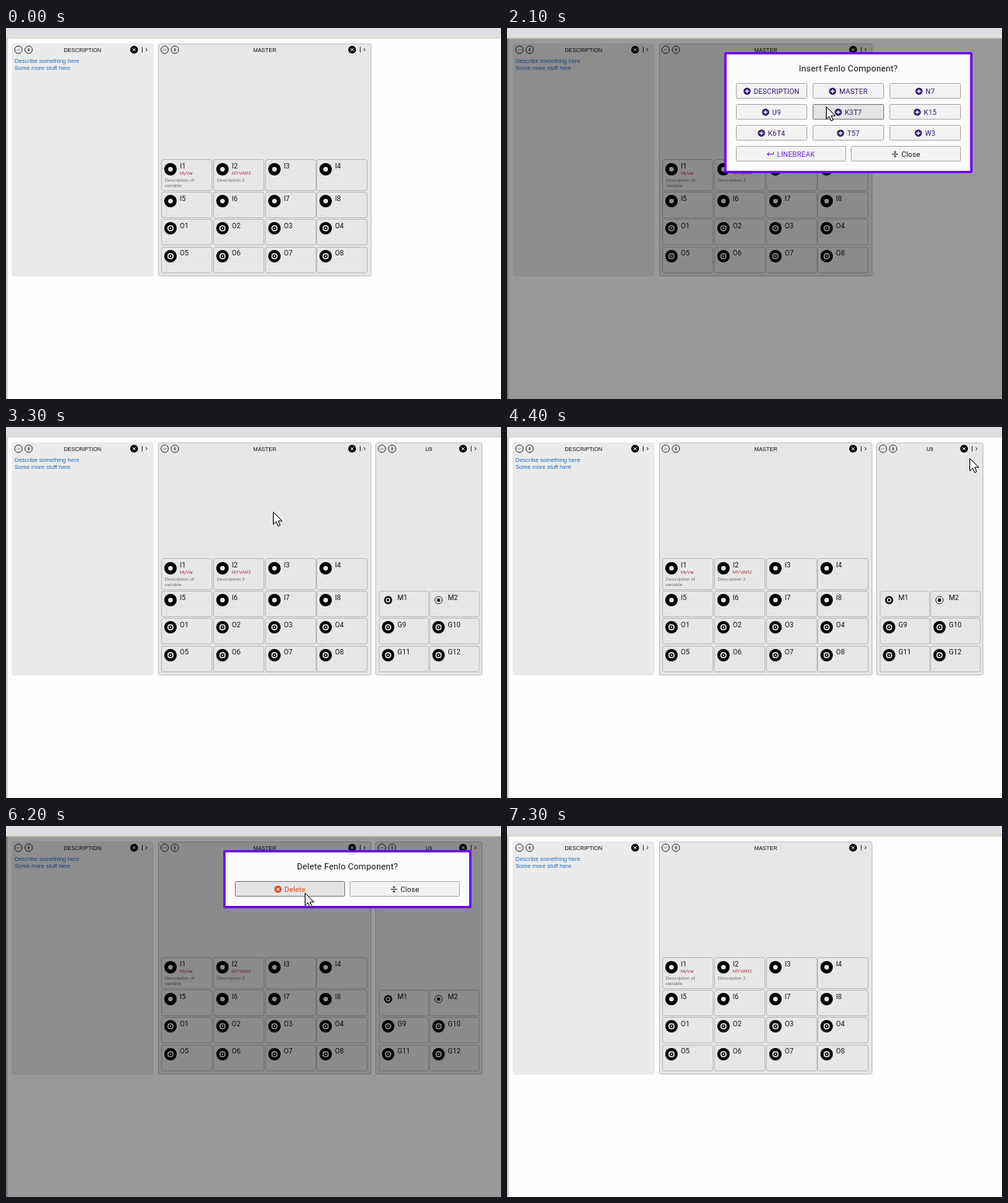
An HTML page that plays this animation: 638x478 px, repeating every 8000 ms.

```html
<!DOCTYPE html>
<html lang="en">
<head>
<meta charset="utf-8">
<title>Module editor</title>
<style>
html, body { margin: 0; width: 100%; height: 100%; overflow: hidden; background: #fff; }
svg { display: block; width: 638px; height: 478px; }
text { font: 7.1px "Liberation Sans", Arial, sans-serif; fill: #111; }
.note { font-size: 7.5px; fill: #2d6cb5; }
.port { font: 9px Roboto, sans-serif; }
.var { font-size: 6.1px; fill: #a8323c; }
.info { font-size: 6.2px; fill: #707070; }
.dots { font-size: 6px; fill: #aaa; }
.line { fill: none; stroke: #222; stroke-width: .9; }
.cell { fill: none; stroke: #bcbcbc; }
.title { font: 11px Roboto, sans-serif; letter-spacing: .2px; text-anchor: middle; }
.button rect { fill: #f3f3f3; stroke: #adadad; }
.button text { font: 9.1px Roboto, sans-serif; letter-spacing: .2px; fill: currentColor; }
.button.hot rect { fill: #e4e4e4; stroke: #808080; }
.button.down rect { fill: #d8d8d8; stroke: #555; }
</style>
</head>
<body>
<svg id="stage" viewBox="0 0 638 478"></svg>
<script>
const LOOP = 8000, STEP = 100;
const stage = document.getElementById('stage');

const rect = (x, y, w, h, attrs) => `<rect x="${x}" y="${y}" width="${w}" height="${h}" ${attrs}/>`;
const disc = (x, y, r, fill = '#000') => `<circle cx="${x}" cy="${y}" r="${r}" fill="${fill}"/>`;
const path = (d, attrs) => `<path d="${d}" ${attrs}/>`;
const text = (x, y, s, cls = '', attrs = '') => `<text x="${x}" y="${y}" class="${cls}" ${attrs}>${s}</text>`;

// Panels
const rows = [[169.5, 40], [211.5, 33], [246.5, 33], [282.5, 33]];

function jack(x, y, kind) {
  if (kind === 'in') return disc(x, y, 8) + disc(x, y, 3, '#e8e8e8');
  if (kind === 'out') return disc(x, y, 8) + disc(x, y, 4, '#eee') + disc(x, y, 2.5) + disc(x, y, 1, '#eee');
  if (kind === 'knob') return disc(x, y, 5.2) + disc(x, y, 3, '#eee') + disc(x, y, 1.7);
  return `<circle cx="${x}" cy="${y}" r="4.8" class="line"/>` + disc(x, y, 2.2);
}

function cell(x, row, w, label, kind, name, info) {
  const [y, h] = rows[row], cy = [182, 223, 258, 294][row], base = [181, 223, 258, 293][row];
  return rect(x, y, w, h, 'rx="2.5" class="cell"') + jack(x + 11.5, cy, kind) +
    text(x + 23.5, base, label, 'port') +
    (name
      ? text(x + 23.5, 189, name, 'var') + info.map((s, i) => text(x + 4, 198 + 7 * i, s, 'info')).join('')
      : text(x + 23.5, base + 9, '..', 'dots') + text(x + 4, y + h - 4 - (row ? 0 : 6), '..', 'dots'));
}

function panel(x, w, title, fill, stroke, body) {
  const right = x + w;
  return rect(x + .5, 20.5, w - 1, 299, `rx="2" fill="${fill}" stroke="${stroke}"`) +
    [8.5, 21.7].map(dx => `<circle cx="${x + dx}" cy="28" r="4.8" class="line"/>`).join('') +
    path(`M${x + 6} 28h5M${x + 19.2} 28h5`, 'class="line" opacity=".45"') +
    path(`M${x + 21.7} 25.5v5`, 'class="line"') +
    text(x + w / 2, 30.5, title, '', 'text-anchor="middle"') +
    disc(right - 24.9, 28, 5) +
    path(`M${right - 26.7} 26.2l3.6 3.6m0-3.6l-3.6 3.6`, 'stroke="#fff"') +
    path(`M${right - 14.5} 24.5v7m4.5-5.5l2 2-2 2`, 'class="line"') + body;
}

const named = { 0: ['MyVar', ['Description of', 'variable']], 1: ['MYVAR2', ['Description 2']] };
const masterCells = Array.from({ length: 16 }, (_, i) =>
  cell(200.5 + Math.round(i % 4 * 66.8), i >> 2, 65, (i < 8 ? 'I' : 'O') + (i % 8 + 1),
    i < 8 ? 'in' : 'out', ...(named[i] || []))).join('');
const extraCells = ['M1', 'M2', 'G9', 'G10', 'G11', 'G12'].map((label, i) =>
  cell(481 + i % 2 * 65, 1 + (i >> 1), 64, label, ['knob', 'ring'][i] || 'out')).join('');

// Dialogs
const round = tilt => disc(0, 0, 4.6, 'currentColor') +
  path('M-2.6 0h5.2M0-2.6v5.2', `stroke="#f3f3f3" stroke-width="1.3" transform="rotate(${tilt})"`);
const icons = {
  plus: round(0),
  cross: round(45),
  enter: path('M4-3V0H-4M-1.5-2.5L-4 0l2.5 2.5', 'fill="none" stroke="currentColor"'),
  fold: path('M-4 0h8M0-4.5v3M0 4.5v-3M-1.5-3L0-1.5 1.5-3M-1.5 3L0 1.5 1.5 3', 'fill="none" stroke="currentColor" stroke-width=".9"')
};
const wide = (side, row, label, icon, color) => ({ x: 295.5 + 148 * side, y: 71.5 + 27 * row, w: 141, label, icon, color });
const modules = ['DESCRIPTION', 'MASTER', 'N7', 'U9', 'K3T7', 'K15', 'K6T4', 'T57', 'W3'].map((label, i) => ({
  x: 295.5 + 99 * (i % 3), y: 71.5 + 27 * Math.floor(i / 3), w: 91, label, icon: 'plus', color: '#32196b'
}));

const dialogs = [
  { title: 'Insert Fenlo Component?', h: 153, open: 1600, close: 3100, lead: 80, press: [2900, 3100],
    buttons: [...modules, wide(0, 3, 'LINEBREAK', 'enter', '#6a1be8'), wide(1, 3, 'Close', 'fold', '#111')] },
  { title: 'Delete Fenlo Component?', h: 72, open: 5300, close: 6700, lead: 110, press: [6400, 6500],
    buttons: [wide(0, 0, 'Delete', 'cross', '#e8400c'), wide(1, 0, 'Close', 'fold', '#111')] }
];

const button = b => `<g class="button" color="${b.color}">${rect(b.x, b.y, b.w, 19, 'rx="1"')}` +
  `<g>${icons[b.icon]}</g>${text(0, b.y + 13.2, b.label)}</g>`;
const dialog = d => `<g class="dialog">${rect(281.5, 32.5, 317, d.h, 'rx="1" fill="#fcfcfc"')}<g>` +
  rect(281.5, 32.5, 317, d.h, 'rx="1" fill="none" stroke="#6c00f5" stroke-width="3"') +
  text(440, 56, d.title, 'title') + d.buttons.map(button).join('') + '</g></g>';

stage.innerHTML =
  rect(0, 0, 638, 478, 'fill="#fefefe"') +
  rect(0, 13, 2, 465, 'fill="#c6c6c6"') +
  panel(7.5, 182.5, 'DESCRIPTION', '#ebebec', '#e6e6e6',
    text(11, 45.3, 'Describe something here', 'note') + text(11, 54, 'Some more stuff here', 'note')) +
  panel(196, 275, 'MASTER', '#e7e7e9', '#c2c2c2', masterCells) +
  `<g id="extra">${panel(476, 138, 'U9', '#e7e7e9', '#c2c2c2', extraCells)}</g>` +
  rect(0, 13, 638, 465, 'id="shade"') +
  rect(0, 0, 638, 12, 'fill="#dfdee0"') + rect(0, 12, 638, 1.5, 'fill="#d6d5c6"') +
  dialogs.map(dialog).join('') +
  '<g id="cursor" fill="#fff" stroke="#000" stroke-linejoin="round">' +
  path('M.5 .5V16.5l3.8-3.6 2.4 5.8 2.6-1.1-2.4-5.6h5.1z', 'id="arrow"') +
  path('M-1.8 14V2a1.8 1.8 0 0 1 3.6 0V9q3-1.4 3.3.8 2.6-1 3 .9 2.6-.4 2.6 2V16q0 3-1.8 5v2.5H.5V21L-5 14.5q-1-2 .5-2.6 1.6-.2 2.7 2.1M1.8 9v4m3.3-3.2v3.2m3-2.3v2.5', 'id="hand"') +
  '</g>';

const [extra, shade, cursor, arrow, hand] =
  ['extra', 'shade', 'cursor', 'arrow', 'hand'].map(id => document.getElementById(id));

// Centre each icon and label in its button
document.querySelectorAll('.dialog').forEach((el, i) => {
  const d = dialogs[i];
  d.el = el;
  el.querySelectorAll('.button').forEach((node, k) => {
    const b = d.buttons[k], label = node.querySelector('text');
    const left = b.x + (b.w - label.getComputedTextLength() - 13) / 2;
    node.querySelector('g').setAttribute('transform', `translate(${left + 4.5} ${b.y + 10})`);
    label.setAttribute('x', left + 13);
    b.el = node;
  });
});

// Pointer keys: time, x, y
const route = [
  [100, 566, 96], [300, 530, 74], [500, 478, 42], [700, 444, 26], [900, 453, 27], [1000, 465, 26.5], [1600, 465, 26.5],
  [1800, 446, 54], [2000, 417, 94], [2100, 411, 101], [2400, 358, 126], [2500, 351, 121], [2600, 344, 109],
  [3300, 344, 109], [3600, 430, 116], [3900, 534, 112], [4200, 572, 76], [4400, 596, 40], [4600, 589, 25],
  [5300, 589, 25], [5500, 530, 50], [5800, 415, 82], [6100, 385, 87], [6200, 385, 86], [6700, 385, 86],
  [7000, 470, 100], [7200, 525, 105]
];

function pointerAt(t) {
  const i = Math.max(1, route.findIndex(key => key[0] >= t));
  const [t0, x0, y0] = route[i - 1], [t1, x1, y1] = route[i], u = (t - t0) / (t1 - t0);
  return [x0 + (x1 - x0) * u, y0 + (y1 - y0) * u];
}

function fade(d, t) {
  if (t < d.open) return 0;
  if (t >= d.close) return Math.max(0, 1 - (t - d.close + 80) / 250);
  return 1 - (1 - Math.min(1, (t - d.open + d.lead) / 400)) ** 2;
}

const show = (el, on) => el.setAttribute('visibility', on ? 'visible' : 'hidden');

function draw(t) {
  const visible = t >= 100 && t < 7300;
  const [x, y] = visible ? pointerAt(t) : [0, 0];
  const pointing = (t >= 1000 && t <= 1600) || (t >= 4600 && t <= 5300);
  cursor.setAttribute('transform', `translate(${x} ${y})`);
  show(arrow, visible && !pointing);
  show(hand, visible && pointing);
  show(extra, t >= 3100 && t < 6700);

  let dim = 0;
  for (const d of dialogs) {
    const a = fade(d, t);
    dim = Math.max(dim, a);
    show(d.el, a > 0);
    d.el.firstChild.setAttribute('opacity', Math.min(1, a * 1.8));
    d.el.lastChild.setAttribute('opacity', a);
    for (const b of d.buttons) {
      const hot = !pointing && x > b.x && x < b.x + b.w && y > b.y && y < b.y + 19;
      b.el.classList.toggle('hot', hot);
      b.el.classList.toggle('down', hot && t >= d.press[0] && t < d.press[1]);
    }
  }
  shade.setAttribute('opacity', dim * .4);
}

const start = performance.now();
function tick() {
  const t = (performance.now() - start) % LOOP;
  draw(Math.floor(t / STEP) * STEP);
  requestAnimationFrame(tick);
}
tick();
</script>
</body>
</html>
```
